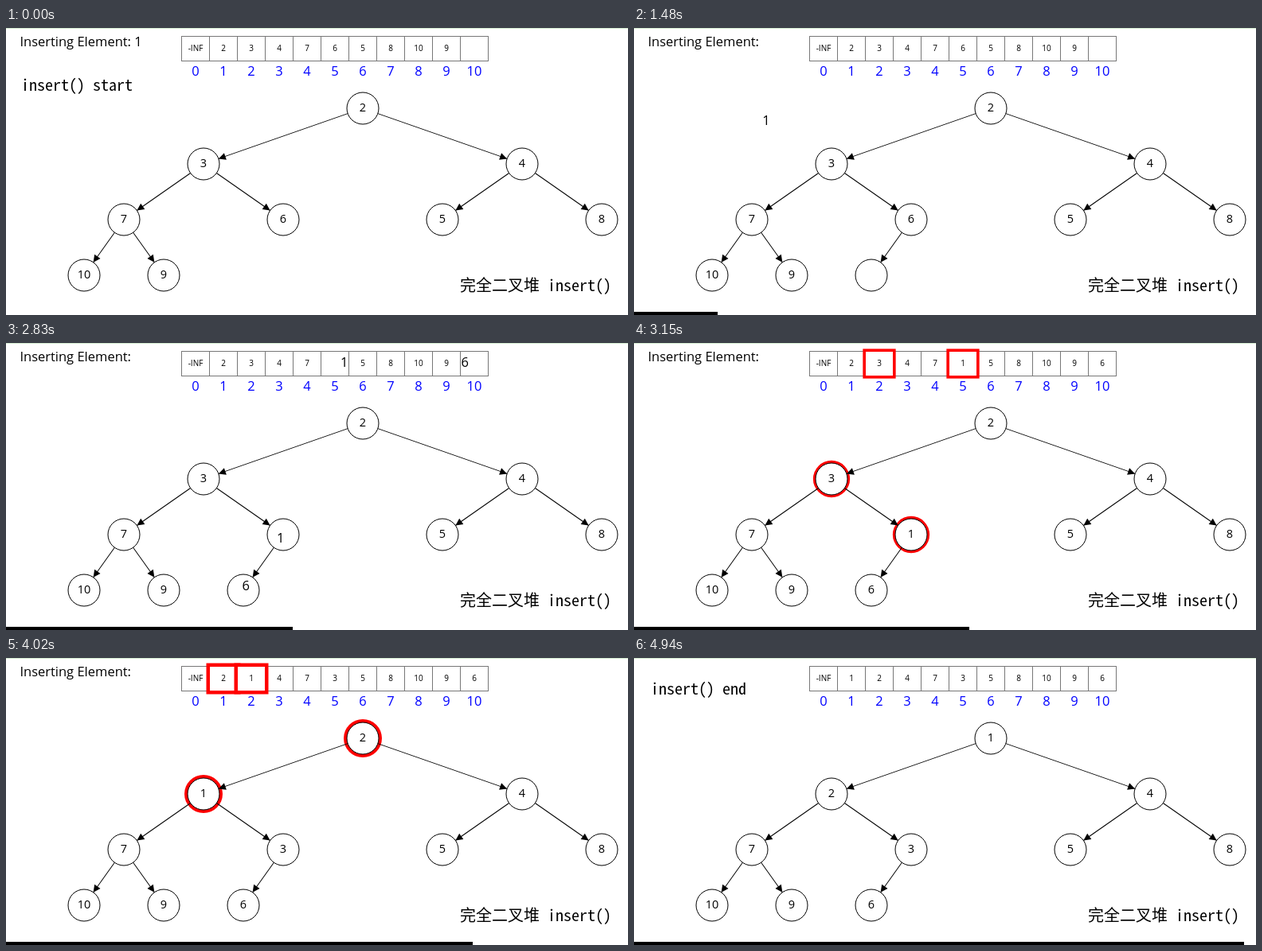
An HTML page with a canvas that plays this animation: 781 px wide and 361 px high, repeating every 6940 ms.

```html
<!DOCTYPE html>
<html lang="zh">
<head>
<meta charset="utf-8">
<title>Heap insert</title>
<style>
  html, body { margin: 0; width: 100%; height: 100%; overflow: hidden; background: #fff; }
  canvas { display: block; }
</style>
</head>
<body>
<canvas id="stage" width="781" height="361"></canvas>
<script>
const ctx = document.getElementById('stage').getContext('2d');
const W = 781, H = 361, LOOP = 6940;
const SANS = '"Open Sans", "Noto Sans", sans-serif';
const MONO = '"Noto Sans Mono CJK SC", "Noto Sans Mono CJK JP", "Noto Sans CJK SC", "Noto Sans CJK JP", monospace';

// Picture clock: after a hold, the picture advances in even steps.
const HOLD = 1000, STEP = 78.8, LAST_STEP = 51;
// Animation clock: ticks grouped in blocks (move, highlight, swap, highlight, swap, ...).
const INSERT_AT = 1340, TICK = 32, BLOCK = 16, END_BLOCK = 7;

const RADIUS = 20, CELL = 35, CELL_TOP = 10.5, CELL_HEIGHT = 31, ARRAY_Y = 25;
const nodes = [null, [448, 101], [248, 171], [648, 171], [148, 241], [348, 241],
  [548, 241], [748, 241], [98, 311], [198, 311], [298, 311]];
const initial = ['-INF', 2, 3, 4, 7, 6, 5, 8, 10, 9, 1];
const path = [10, 5, 2, 1];

const cellLeft = i => 220.5 + i * CELL;
const cellCenter = i => [cellLeft(i) + CELL / 2, ARRAY_Y];
const lerp = (a, b, k) => [a[0] + (b[0] - a[0]) * k, a[1] + (b[1] - a[1]) * k];

function text(value, x, y, size, align = 'center', color = '#000', family = SANS) {
  ctx.font = `${size}px ${family}`;
  ctx.textAlign = align;
  ctx.fillStyle = color;
  ctx.fillText(value, x, y);
}

const movingLabel = (value, from, to, k) => {
  const [x, y] = lerp(from, to, k);
  text(value, x, y + 5, 16.5);
};

function disc(x, y, radius, color) {
  ctx.beginPath();
  ctx.arc(x, y, radius, 0, 2 * Math.PI);
  ctx.fillStyle = color;
  ctx.fill();
}

function drawCell(i, value, glow) {
  const x = cellLeft(i);
  if (glow) {
    ctx.fillStyle = '#f00';
    ctx.fillRect(x - glow, CELL_TOP - glow, CELL + 2 * glow, CELL_HEIGHT + 2 * glow);
    ctx.fillStyle = '#fff';
    ctx.fillRect(x + .5, CELL_TOP + .5, CELL - 1, CELL_HEIGHT - 1);
  } else {
    ctx.strokeStyle = '#777';
    ctx.strokeRect(x, CELL_TOP, CELL, CELL_HEIGHT);
  }
  text(value, x + CELL / 2, 28.5, 10);
}

function drawNode(i, value, glow) {
  const [x, y] = nodes[i];
  if (glow) disc(x, y, RADIUS + glow, '#f00');
  disc(x, y, RADIUS, '#fff');
  ctx.strokeStyle = '#000';
  ctx.stroke();
  text(value, x, y + 4, 14.5);
}

function drawEdge(from, to) {
  const length = Math.hypot(to[0] - from[0], to[1] - from[1]);
  ctx.save();
  ctx.translate(...from);
  ctx.rotate(Math.atan2(to[1] - from[1], to[0] - from[0]));
  const tip = length - RADIUS;
  ctx.strokeStyle = ctx.fillStyle = '#000';
  ctx.beginPath();
  ctx.moveTo(RADIUS, 0);
  ctx.lineTo(tip, 0);
  ctx.stroke();
  ctx.beginPath();
  ctx.moveTo(tip, 0);
  ctx.lineTo(tip - 9, -4.5);
  ctx.lineTo(tip - 9, 4.5);
  ctx.fill();
  ctx.restore();
}

function draw(time) {
  const step = time < HOLD ? 0
    : Math.min(LAST_STEP, 1 + Math.floor((time - HOLD) / STEP + 1e-6));
  const shownTime = step ? HOLD + (step - 1) * STEP : 0;
  const tick = Math.floor((shownTime - INSERT_AT) / TICK);
  const block = Math.min(END_BLOCK, Math.floor(tick / BLOCK));
  const progress = (tick % BLOCK) / (BLOCK - 1);
  const inserted = block >= 0, ended = block === END_BLOCK;

  const swapsDone = Math.max(0, Math.floor((block - 1) / 2));
  const values = [...initial];
  for (let s = 0; s < swapsDone; s++) {
    const a = path[s], b = path[s + 1];
    [values[a], values[b]] = [values[b], values[a]];
  }
  const child = path[swapsDone], parent = path[swapsDone + 1];
  const active = i => i === child || i === parent;
  const highlighting = block > 0 && block % 2 === 1 && !ended;
  const swapping = block > 0 && block % 2 === 0;
  const pulse = 3 + Math.abs(((tick + 30) % 35) / 7 - 2);

  const glowOf = i => highlighting && active(i) ? pulse : 0;
  const shown = i => (swapping && active(i)) || (i === 10 && block < 1) ? '' : values[i];

  ctx.fillStyle = '#fff';
  ctx.fillRect(0, 0, W, H);
  ctx.fillStyle = '#d6edd2';
  ctx.fillRect(0, 0, W, 1);
  ctx.lineWidth = 1;

  // Highlighted shapes lie above the plain ones.
  for (const lit of [false, true]) {
    for (let i = 0; i <= 10; i++) {
      const glow = glowOf(i);
      if (!!glow !== lit) continue;
      drawCell(i, shown(i), glow);
      if (i > 0 && (i < 10 || inserted)) drawNode(i, shown(i), glow);
    }
  }
  for (let i = 2; i <= (inserted ? 10 : 9); i++) drawEdge(nodes[i >> 1], nodes[i]);
  for (let i = 0; i <= 10; i++) text(i, cellCenter(i)[0], 60, 16.5, 'center', '#00f');

  if (block === 0) movingLabel(1, [118, 46], nodes[10], progress);
  if (swapping) {
    for (const [a, b] of [[child, parent], [parent, child]]) {
      movingLabel(values[a], cellCenter(a), cellCenter(b), progress);
      movingLabel(values[a], nodes[a], nodes[b], progress);
    }
  }

  if (!ended) text('Inserting Element:' + (inserted ? '' : ' 1'), 17.4, 23, 16.5, 'left');
  if (step === 0) text('insert() start', 19, 79, 20, 'left', '#000', MONO);
  if (ended) text('insert() end', 21, 46, 20, 'left', '#000', MONO);
  text('完全二叉堆 insert()', 570, 331, 20, 'left', '#000', MONO);

  ctx.fillStyle = '#000';
  ctx.fillRect(0, 357, Math.round(W * step / (LAST_STEP + 1)), 4);
}

const start = performance.now();
function frame() {
  draw((performance.now() - start) % LOOP);
  requestAnimationFrame(frame);
}
frame();
</script>
</body>
</html>
```
